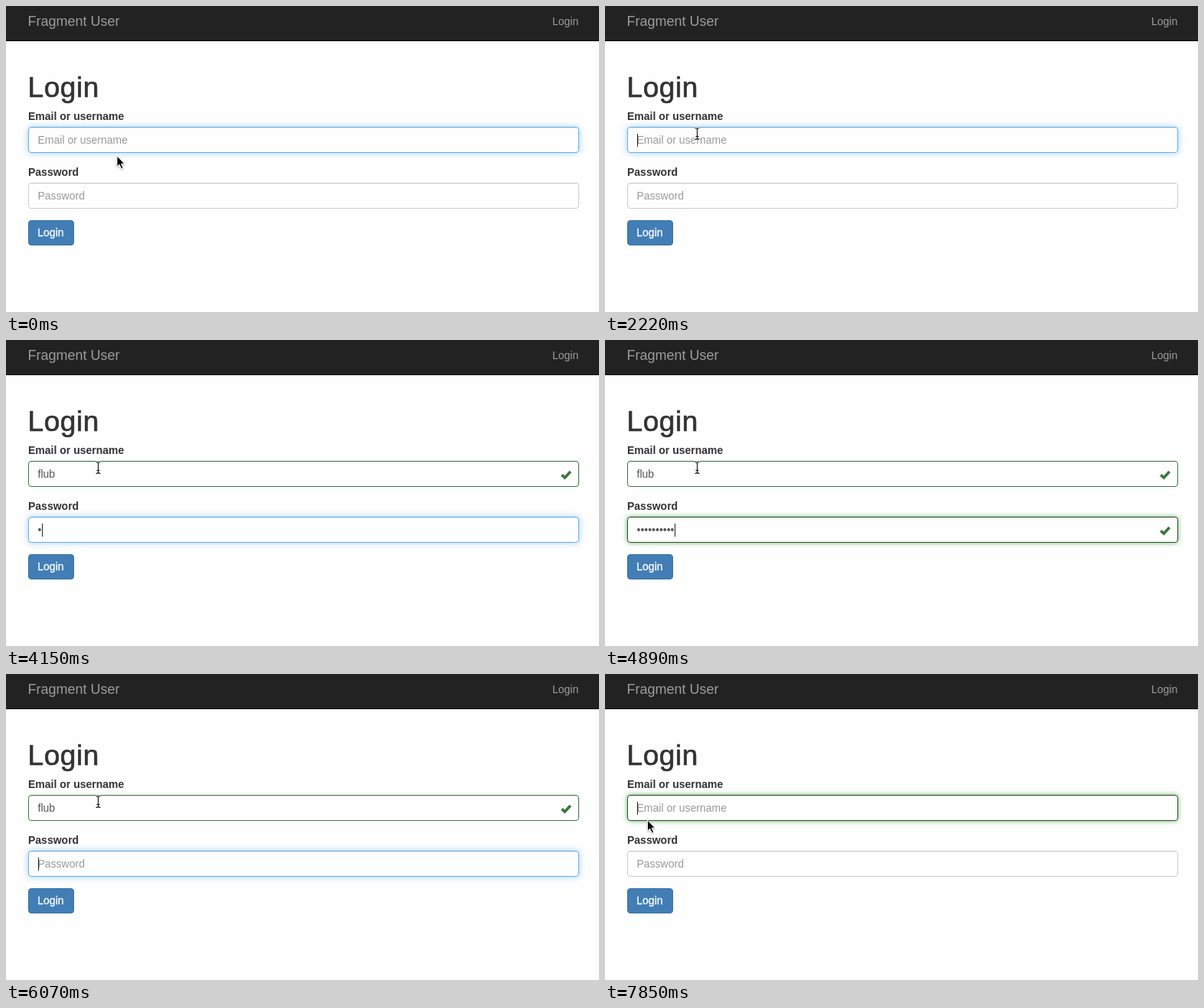
Recreate the animation shown at these times as an HTML page. Size 775 by 400 pixels, loop 8 s.

```html
<!DOCTYPE html>
<html lang="en">
<head>
<meta charset="utf-8">
<title>Login form</title>
<style>
  html, body { margin: 0; width: 100%; height: 100%; overflow: hidden; background: #fefefe; }
  svg { display: block; width: 775px; height: 400px; }
  text { font: 14px "Liberation Sans", Arial, sans-serif; white-space: pre; }
  .label { font-weight: bold; fill: #333; }
  .nav { fill: #9d9d9d; }
  .brand { font-size: 18px; }
  .title { font-size: 37px; letter-spacing: .6px; fill: #333; stroke: #333; stroke-width: .7px; }
  .button { fill: #fff; stroke: #fff; stroke-width: .3px; }
</style>
</head>
<body>
<svg viewBox="0 0 775 400">
  <defs>
    <filter id="soft4" x="-5%" y="-100%" width="110%" height="300%"><feGaussianBlur stdDeviation="4"/></filter>
    <filter id="soft3" x="-5%" y="-100%" width="110%" height="300%"><feGaussianBlur stdDeviation="3"/></filter>
    <filter id="drop" x="-50%" y="-50%" width="200%" height="200%">
      <feDropShadow dx="0" dy="1" stdDeviation=".8" flood-opacity=".35"/>
    </filter>
  </defs>
  <rect width="775" height="400" fill="#fefefe"/>
  <rect width="775" height="45" fill="#222"/>
  <rect y="45" width="775" height="1" fill="#080808"/>
  <text class="nav brand" x="28.5" y="26">Fragment User</text>
  <text class="nav" x="714" y="25">Login</text>
  <text class="title" x="28.5" y="118.5">Login</text>
  <text class="label" x="29" y="149">Email or username</text>
  <text class="label" x="29" y="222">Password</text>
  <g id="fields"></g>
  <rect x="29.5" y="280.5" width="59" height="32" rx="3.5" fill="#427eb5" stroke="#3a70a3"/>
  <text class="button" x="41.3" y="301">Login</text>
  <g id="arrow" filter="url(#drop)">
    <path d="M0 0V14.2L3.2 11.2L5.8 17L8.2 16L5.7 10.3H10Z" fill="#000" stroke="#fff"/>
  </g>
  <g id="beam" fill="none">
    <path id="beamShape" d="M-3 -7.5Q0 -7.5 0 -5.5Q0 -7.5 3 -7.5M0 -6V6M-3 7.5Q0 7.5 0 5.5Q0 7.5 3 7.5M-2 3.5H2"
      stroke="#fff" stroke-width="2.6" stroke-opacity=".8"/>
    <use href="#beamShape" style="stroke:#111"/>
    <path d="M-3 -7.5Q0 -7.5 0 -5.5Q0 -7.5 3 -7.5M0 -6V6M-3 7.5Q0 7.5 0 5.5Q0 7.5 3 7.5M-2 3.5H2" stroke="#111" stroke-width="1.1"/>
  </g>
</svg>
<script>
const LOOP = 8000;
const NAME = "flub";
const $ = id => document.getElementById(id);

function add(parent, tag, attrs) {
  const el = document.createElementNS("http://www.w3.org/2000/svg", tag);
  for (const key in attrs) el.setAttribute(key, attrs[key]);
  return parent.appendChild(el);
}

const mix = (a, b, k) => a.map((v, i) => v + (b[i] - v) * k);
const GRAY = [204, 204, 204], BLUE = [102, 175, 233];
const GREEN = [60, 118, 61], DEEP = [43, 84, 44];

function makeField(y, hint) {
  const g = add($("fields"), "g", { transform: `translate(29 ${y})` });
  const box = { width: 720, height: 34, rx: 4 };
  const blueGlow = add(g, "rect", { ...box, fill: "#66afe9", filter: "url(#soft4)" });
  const greenGlow = add(g, "rect", { ...box, fill: "#67b168", filter: "url(#soft3)" });
  const frame = add(g, "rect", { x: .5, y: .5, width: 719, height: 33, rx: 3.5, fill: "#fefefe" });
  add(g, "path", { d: "M3 1.5H717", stroke: "#000", "stroke-opacity": .06 });
  const mark = add(g, "rect", { x: 13, y: 9, height: 17, fill: "#b5d5fe" });
  const text = add(g, "text", { x: 12.5, y: 22 });
  const caret = add(g, "rect", { y: 9, width: 1, height: 17, fill: "#222" });
  const check = add(g, "path", {
    d: "M697.3 18.3L701.4 22L708.7 14", fill: "none", stroke: "#3c763d", "stroke-width": 3.6
  });

  return ({ value, green, focus, caretOn, ok, selected }) => {
    const edge = mix(mix(GRAY, BLUE, focus), mix(GREEN, DEEP, focus), green);
    frame.setAttribute("stroke", `rgb(${edge.map(Math.round)})`);
    blueGlow.setAttribute("opacity", .6 * focus * (1 - green));
    greenGlow.setAttribute("opacity", focus * green);
    text.textContent = value || hint;
    text.setAttribute("fill", value ? "#555" : "#999");
    const end = value ? text.getComputedTextLength() : 0;
    caret.setAttribute("x", Math.round(13 + end));
    caret.setAttribute("opacity", caretOn ? 1 : 0);
    check.setAttribute("opacity", ok ? 1 : 0);
    mark.setAttribute("width", end * selected);
    mark.setAttribute("x", 13 + end * (1 - selected));
  };
}

const drawUser = makeField(158, "Email or username");
const drawPass = makeField(231, "Password");

const blank = { value: "", green: 0, focus: 0, caretOn: false, ok: false, selected: 0 };
const dots = n => "•".repeat(n);
const on = { caretOn: true }, off = { caretOn: false };
const arrow = (x, y) => ["arrow", x, y];
const beam = (x, y) => ["beam", x, y];

// Each step changes only what it names: [time, { u: user, p: password, at: pointer }]
const steps = [
  [0, { u: { focus: 1 }, at: arrow(145, 196) }],
  [140, { at: arrow(138, 192) }],
  [290, { u: on, at: beam(122, 171) }],
  [440, { at: beam(120.5, 168) }],
  [730, { u: off, at: beam(120.5, 167) }],
  [1180, { u: on }],
  [1620, { u: off }],
  [2220, { u: on }],
  [2520, { u: { value: NAME.slice(0, 2), green: .3 } }],
  [2670, { u: { value: NAME, green: 1, ok: true } }],
  [3110, { u: { focus: .9, caretOn: false }, p: { focus: .05, caretOn: true } }],
  [3260, { u: { focus: .3 }, p: { focus: .4 } }],
  [3410, { u: { focus: 0 }, p: { focus: 1 } }],
  [3850, { p: off }],
  [4150, { p: { value: dots(1), caretOn: true } }],
  [4300, { p: { value: dots(3) } }],
  [4450, { p: { value: dots(4) } }],
  [4590, { p: { value: dots(6) } }],
  [4740, { p: { value: dots(8), green: .5, ok: true } }],
  [4890, { p: { value: dots(10), green: 1 } }],
  [5340, { p: off }],
  [5780, { p: on }],
  [5930, { p: { value: "", green: .5, ok: false } }],
  [6070, { p: { green: 0 } }],
  [6520, { p: off }],
  [6670, { at: beam(104, 170) }],
  [6820, { at: beam(74, 175) }],
  [6970, { u: { focus: .5, caretOn: true }, p: { focus: .5 }, at: beam(66, 176) }],
  [7110, { u: { focus: 1, caretOn: false, selected: .7 }, p: { focus: 0 }, at: beam(48, 170) }],
  [7260, { u: { selected: 1 }, at: beam(14, 150) }],
  [7400, { at: beam(4, 134) }],
  [7550, { at: arrow(40, 181) }],
  [7700, { at: arrow(50, 188) }],
  [7850, { u: { value: "", ok: false, selected: 0, caretOn: true }, at: arrow(55.5, 191) }]
];

function stateAt(t) {
  const state = { u: { ...blank }, p: { ...blank }, at: null };
  for (const [time, change] of steps) {
    if (time > t) break;
    Object.assign(state.u, change.u);
    Object.assign(state.p, change.p);
    state.at = change.at || state.at;
  }
  return state;
}

function render(t) {
  const { u, p, at: [kind, x, y] } = stateAt(t);
  drawUser(u);
  drawPass(p);
  for (const id of ["arrow", "beam"]) {
    $(id).setAttribute("visibility", id === kind ? "visible" : "hidden");
    $(id).setAttribute("transform", `translate(${x} ${y})`);
  }
}

const start = performance.now();
function tick() {
  render((performance.now() - start) % LOOP);
  requestAnimationFrame(tick);
}
tick();
</script>
</body>
</html>
```
